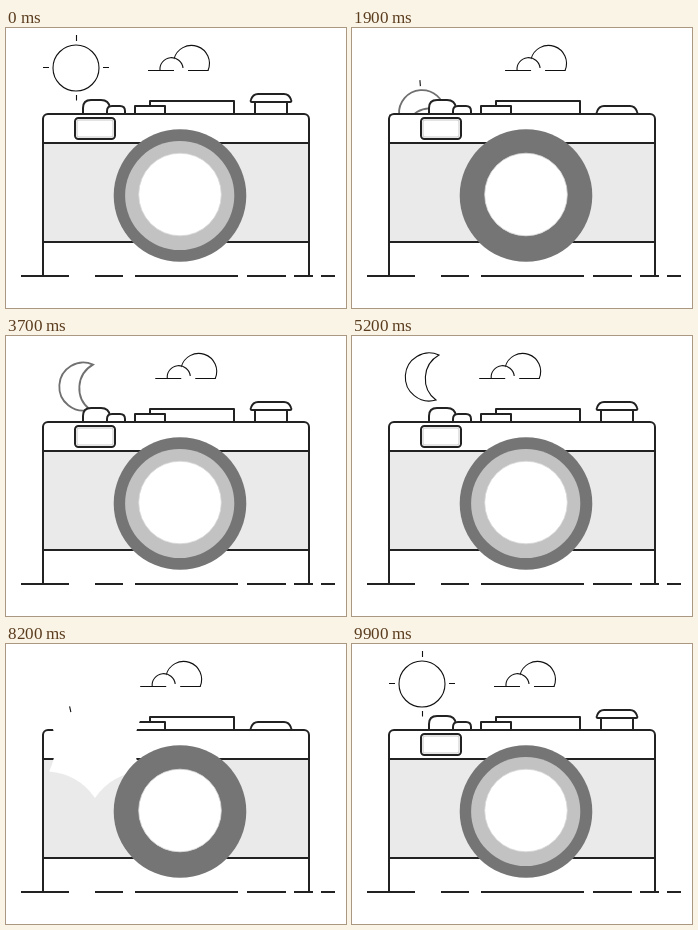
An HTML page for the animation above (10000 ms loop, 340 by 280 pixels).

```html
<!DOCTYPE html>
<html lang="en">
<head>
<meta charset="utf-8">
<title>Camera, day and night</title>
<style>
html, body { margin: 0; width: 100%; height: 100%; overflow: hidden; background: #fff; }
svg { display: block; width: 340px; height: 280px; }
.thin { fill: none; stroke: #111; stroke-width: 1.1; }
.bold { fill: #fff; stroke: #222; stroke-width: 2; stroke-linejoin: round; }
.moving { stroke: #707070; stroke-width: 1.8; }
</style>
</head>
<body>
<svg viewBox="0 0 340 280">
  <g id="sun" class="thin">
    <circle id="disc" class="thin" cx="70" cy="40" r="23"/>
    <path d="M70.5 7v6M70.5 67v5.5M37 39.5h6M97 39.5h6"/>
  </g>
  <path id="moon" class="thin" d="M87 19A24 24 0 1 0 84 64A27 27 0 0 1 87 19Z"/>
  <g id="cloud" class="thin">
    <path d="M142 42.5h26M182 42.5h20.5"/>
    <path d="M154 42.5A11.5 11.5 0 1 1 177 40M168 31A18 18 0 1 1 202 42.5"/>
  </g>

  <g class="bold">
    <g id="button">
      <path d="M249 74H281V90H249Z"/>
      <path d="M246 74Q244 74 245 71.5Q247 66 252 66H278Q283 66 285 71.5Q286 74 284 74Z"/>
    </g>
    <path d="M144 73H228V86H144Z"/>
    <path d="M129 78H159V86H129Z"/>
    <path d="M77 86V80Q77 72 85 72H95Q103 72 104 80V86"/>
    <path d="M101 86V83Q101 78 106 78H114Q119 78 119 83V86"/>
    <path d="M37 248V91A5 5 0 0 1 42 86H298A5 5 0 0 1 303 91V248"/>
    <path style="fill:#eaeaea" d="M37 115H303V214H37Z"/>
    <rect x="69" y="90" width="40" height="21" rx="3.5"/>
  </g>
  <rect x="71" y="92" width="36" height="17" rx="2" fill="none" stroke="#c8c8c8"/>
  <path id="flash" fill="#fff"/>

  <circle cx="174" cy="167.5" r="66.3" fill="#757575"/>
  <circle id="iris" cx="173.7" cy="167.5" fill="#c2c2c2"/>
  <circle cx="174" cy="166.5" r="41.3" fill="#fff" stroke="#d8d8d8" stroke-width=".8"/>
  <path stroke="#222" stroke-width="2" d="M15 248H63M89 248H117M129 248H232M241 248H280M288 248H307M315 248H329"/>
</svg>
<script>
const $ = id => document.getElementById(id);
const { min, max, sin, cos, PI } = Math;

// Rises from 0 to 1 after `on`, holds, and is back at 0 by `off`.
const pulse = (t, on, off, rise, fall) =>
  max(0, min(1, (t - on) / rise, (off - t) / fall));

// Six-pointed star with hollow sides, one point straight down.
function star(r) {
  const at = (k, i) => `${89 + k * sin(i * PI / 3)} ${101 + k * cos(i * PI / 3)}`;
  let d = "M" + at(r, 0);
  for (let i = 0; i < 6; i++) d += `Q${at(r * .63, i + .5)} ${at(r, i + 1)}`;
  return d;
}

const place = (id, x, y, turn = 0) =>
  $(id).setAttribute("transform", `translate(${x} ${y}) rotate(${turn} 70 40)`);

const end = 9.4, secondShot = 6.2;

function draw(now) {
  const ms = Math.floor(now % 10000 / 100) * 100;
  const t = max(0, ms - 500) / 1000;
  const day = t < 5;
  const shot = day ? t : t - secondShot;

  const sun = 32.2 * min(t, end - t, 2.6);
  const moon = 30 * max(0, 3.52 - t, t - 5.95);
  place("sun", 0, sun, -sun * (day ? .1 : .22));
  place("moon", 0, moon);
  $("disc").classList.toggle("moving", sun > .01);
  $("moon").classList.toggle("moving", moon > 0);

  // Drifts right, quickly left, then slowly home.
  place("cloud", max(min(7.9 * t, 54.3 - 14.7 * t), 4.6 * (t - end)), 0);

  place("button", 0, 12 * pulse(shot, .3, 2.9, 1, 1));
  $("iris").setAttribute("r", 54.6 - 14 * pulse(shot, 1.1, 1.9, .25, .3));
  $("flash").setAttribute("d", star(53 * pulse(shot, 1.4, 2.3, .1, .27)));
}

const start = performance.now();
function tick() {
  draw(performance.now() - start);
  requestAnimationFrame(tick);
}
tick();
</script>
</body>
</html>
```
